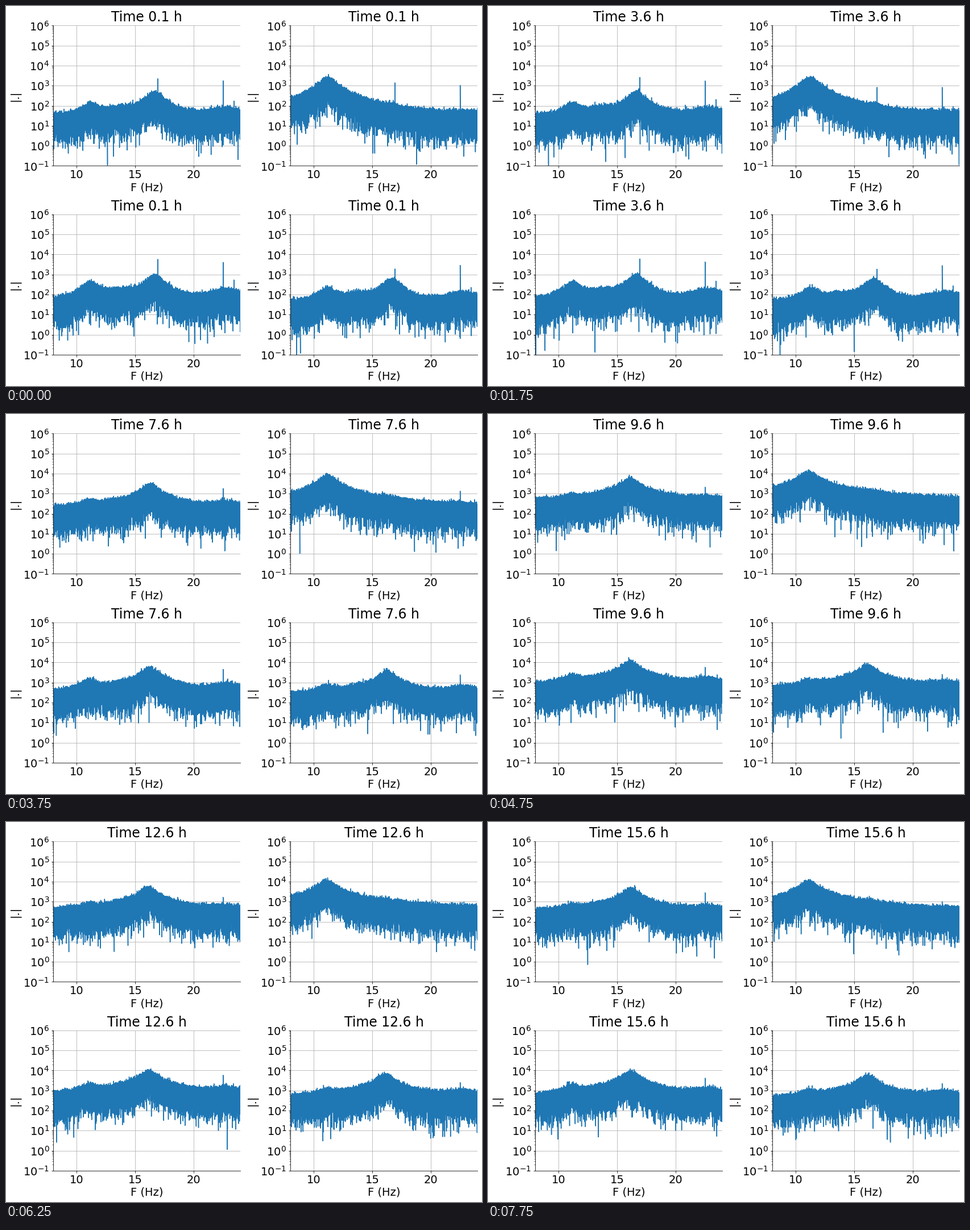
A matplotlib script for the animation above (8000 ms loop, 837 by 669 pixels).

```python
import numpy as np
import matplotlib.pyplot as plt
from matplotlib.animation import FuncAnimation
from matplotlib.ticker import LogLocator, NullFormatter

W, H, DPI = 837, 669, 72
AX_W, AX_H = 328.8, 247
FRAMES, STEP_MS = 32, 250
COLS, PER_COL = 640, 70

# Activity over the hours: 0 quiet, 1 busy
HOURS = [0.1, 3.6, 5.6, 7.6, 9.6, 15.6]
ACTIVITY = [0, 0, 0.52, 0.73, 1, 0.91]

# Resonances: quiet centre, shift when busy, relative width
MODES = [(11.2, -0.1, 1.1), (13.8, 0, 2.5), (16.65, -0.55, 1), (22.8, 0, 2.5)]

# Quiet log10 height of the floor and of each resonance, one row per panel
HEIGHTS = [
    (1.60, 2.15, 1.95, 2.72, 1.90),
    (1.65, 3.43, 1.80, 1.90, 1.50),
    (1.75, 2.65, 2.30, 3.00, 2.30),
    (1.70, 2.35, 2.10, 2.82, 2.15),
]
GAIN = np.array([1.0, 0.7, 0.8, 1.1, 0.9])

# Narrow tones: frequency, offset from the panel's tone height, fading
TONES = [(16.95, 0, 2.4), (17.95, -1, 1), (22.52, 0, 0), (23.45, -1, 0.1)]
TONE_HEIGHTS = (3.32, 2.97, 3.67, 3.37)

freq = np.linspace(8, 24, COLS)
xs = np.repeat(freq, 2)


def hour(i):
    return 0.1 + 0.5 * i


def upper_edge(panel, act):
    """Power sum of a flat floor and resonance curves."""
    floor, *peaks = 10 ** (HEIGHTS[panel] + GAIN * act)
    width = 0.68 - 0.18 * act
    order = 1.6 - 0.6 * act
    power = np.full(COLS, floor ** 2)
    for peak, (centre, shift, rel) in zip(peaks, MODES):
        x = (freq - centre - shift * act) / (width * rel)
        power += peak ** 2 / (1 + x ** 2) ** order
    return np.sqrt(power)


def spectrum(panel, i):
    """Lowest and highest amplitude of each narrow column, interleaved."""
    rng = np.random.default_rng(100 + 4 * i + panel)
    act = np.interp(hour(i), HOURS, ACTIVITY)
    noise = np.sqrt(rng.exponential(size=(COLS, PER_COL)))
    scale = upper_edge(panel, act) / 2.3
    low, high = scale * noise.min(axis=1), scale * noise.max(axis=1)
    for f0, offset, fade in TONES:
        col = np.abs(freq - f0).argmin()
        level = TONE_HEIGHTS[panel] + offset - fade * act + rng.normal(0, 0.08)
        high[col] = max(high[col], 10 ** level)
    return np.column_stack([low, high]).ravel()


def make_axes(left, top):
    ax = fig.add_axes([left / W, 1 - (top + AX_H) / H, AX_W / W, AX_H / H])
    ax.set_yscale("log")
    ax.set_xlim(8, 24)
    ax.set_ylim(1e-1, 1e6)
    ax.set_xticks([10, 15, 20])
    ax.yaxis.set_major_locator(LogLocator(numticks=20))
    ax.yaxis.set_minor_locator(LogLocator(subs=np.arange(2, 10), numticks=20))
    ax.yaxis.set_minor_formatter(NullFormatter())
    ax.grid(True, color="#b0b0b0", linewidth=0.8)
    ax.spines[["top", "right"]].set_visible(False)
    ax.set_xlabel("F (Hz)", labelpad=3)
    ax.set_ylabel("|.|", labelpad=4.5)
    return ax


plt.rcParams.update({"font.family": "DejaVu Sans", "font.size": 19.5})
fig = plt.figure(figsize=(W / DPI, H / DPI), dpi=DPI, facecolor="white")
axes = [make_axes(x, y) for y in (34.4, 366.8) for x in (83.3, 500.2)]
lines = [ax.plot(xs, np.ones_like(xs), color="#1f77b4", linewidth=1.5)[0] for ax in axes]
titles = [ax.set_title("", fontsize=23.5, pad=7.2) for ax in axes]


def update(i):
    for panel, (line, title) in enumerate(zip(lines, titles)):
        line.set_ydata(spectrum(panel, i))
        title.set_text(f"Time {hour(i):.1f} h")
    return lines + titles


anim = FuncAnimation(fig, update, frames=FRAMES, interval=STEP_MS,
                     init_func=lambda: update(0), repeat=True, repeat_delay=0)
plt.show()
```
